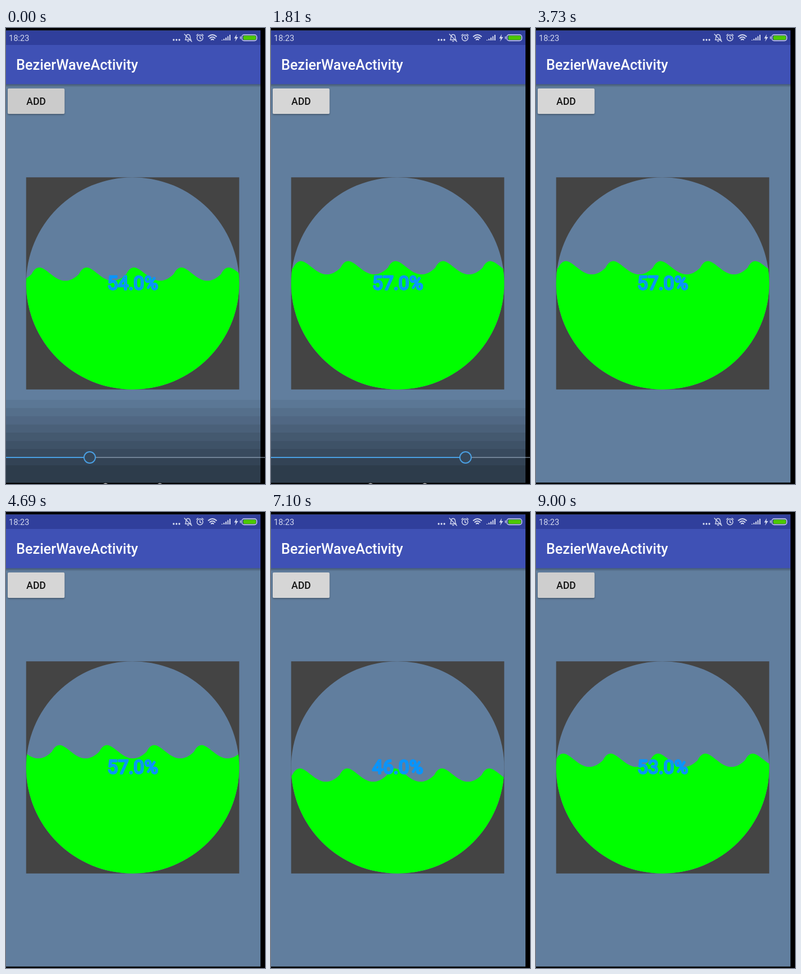
An HTML page that plays this animation: 458 by 807 pixels, repeating every 9.1 s.

```html
<!DOCTYPE html>
<html lang="en">
<head>
<meta charset="utf-8">
<title>Bezier wave</title>
<style>
  html, body { margin: 0; width: 100%; height: 100%; overflow: hidden; background: #000; }
  svg { display: block; width: 458px; height: 807px; }
  text { font-family: Roboto, sans-serif; }
  .medium { font-weight: 500; }
  .icon { fill: none; stroke: #d3d8ee; stroke-width: 1.4; stroke-linecap: round; }
  .solid { fill: #d3d8ee; }
  .screen { fill: #617e9e; }
  #percent { font-size: 33.5px; fill: none; stroke: #0a94fa; stroke-width: 2.8; stroke-linejoin: round; }
</style>
</head>
<body>
<svg viewBox="0 0 458 807">
  <defs>
    <clipPath id="disc"><ellipse cx="224" cy="452" rx="188.4" ry="187.7"/></clipPath>
    <linearGradient id="shade" x2="0" y2="1">
      <stop offset="0" stop-opacity=".28"/>
      <stop offset="1" stop-opacity="0"/>
    </linearGradient>
    <filter id="lift" x="-10%" y="-20%" width="120%" height="150%">
      <feDropShadow dx="0" dy="1.5" stdDeviation="1.5" flood-opacity=".35"/>
    </filter>
  </defs>

  <rect class="screen" y="4.5" width="450" height="800"/>
  <rect y="4.5" width="450" height="25.5" fill="#303f9c"/>
  <rect y="30" width="450" height="69.500" fill="#3f51b5"/>
  <rect y="99.500" width="450" height="5.500" fill="url(#shade)"/>

  <text x="5" y="23" font-size="14.5" fill="#d3d8ee">18:23</text>
  <g class="solid">
    <circle cx="296.5" cy="21" r="1.7"/>
    <circle cx="301.5" cy="21" r="1.7"/>
    <circle cx="306.5" cy="21" r="1.7"/>
    <path d="M408 11L403.500 18.500H406.500L405 24L410.500 16H407.300Z"/>
  </g>
  <g class="icon">
    <path d="M317 21H327C325.500 19 326 17 325.500 14.500C324.500 10.500 319.500 10.500 318.500 14.500C318 17 318.500 19 317 21M321 23.500H323M315.500 11L328.500 24"/>
    <circle cx="343" cy="17.500" r="5.200"/>
    <path d="M343 14.500V18L345 19M337 13L339.500 11M349 13L346.500 11"/>
    <path d="M358 15Q365 9 372 15M360.500 18Q365 14 369.500 18M363 20.800Q365 19 367 20.800" stroke-width="2"/>
    <path d="M382 22V21M385.500 22V19M389 22V17M392.500 22V14.500M396 22V12" stroke-width="2" stroke-linecap="butt"/>
    <rect x="417" y="12" width="26.500" height="10.500" rx="4"/>
    <path d="M414.500 15.500V19"/>
  </g>
  <rect x="419.500" y="13.500" width="22.500" height="7.500" rx="2" fill="#4cc800"/>

  <text class="medium" x="18" y="74.300" font-size="25.100" fill="#fff">BezierWaveActivity</text>
  <rect id="button" x="3" y="107" width="100.500" height="45" rx="2" filter="url(#lift)"/>
  <text class="medium" x="53.300" y="136" font-size="17.500" text-anchor="middle" fill="#151515">ADD</text>

  <rect x="35.600" y="264.300" width="376.800" height="375.400" fill="#444"/>
  <g clip-path="url(#disc)">
    <rect class="screen" x="35" y="264" width="378" height="376"/>
    <path id="wave" fill="#0f0"/>
  </g>
  <text id="percent" x="224" y="463" text-anchor="middle"></text>

  <g id="player">
    <g id="bands"></g>
    <path id="rest" stroke="#a9bdd2" stroke-opacity=".5" stroke-width="2"/>
    <path id="played" stroke="#4a9fe2" stroke-width="2"/>
    <circle id="thumb" cy="760" r="10" fill="#35475a" stroke="#4a9fe2" stroke-width="2"/>
    <circle cx="176" cy="811.500" r="6" fill="#ccc"/>
    <circle cx="272" cy="811.500" r="6" fill="#ccc"/>
  </g>
</svg>
<script>
  const LOOP = 9100;
  const STEPS = 67;   // the picture advances in equal steps
  const RESTART = 39;
  const PERIOD = 376.8 / 4.5;
  const $ = id => document.getElementById(id);
  const clamp = (v, lo, hi) => Math.min(hi, Math.max(lo, v));

  // Each period is one cubic; its crest lies 15 px after the start.
  function wavePath(crest, level) {
    let x = (crest - 15) % PERIOD - PERIOD;
    let d = `M${x} ${level}`;
    for (; x < 420; x += PERIOD) {
      d += `C${x + PERIOD / 4} ${level - 41} ${x + PERIOD / 2} ${level + 41} ${x + PERIOD} ${level}`;
    }
    return d + 'V645H-200Z';
  }

  function drawBands() {
    const count = 9, height = 146.5 / count;
    for (let i = 0; i < count; i++) {
      const y = 658 + i * 14.5;
      const bottom = i < count - 1 ? y + 14.5 : y + height + 14;
      $('bands').innerHTML += `<rect y="${y}" width="450" height="${bottom - y}"
        fill="#020406" opacity="${0.06 * (i + 1)}"/>`;
    }
  }

  // The button is tapped once every two steps, around the loop's seam.
  function stateAt(step) {
    if (step < RESTART) {
      return {
        percent: 54 + Math.min(3, Math.floor(step / 2)),
        crest: 60.3 + 5.98 * step,
        grey: clamp(203 + 3 * (step - 6), 203, 214)
      };
    }
    return {
      percent: 46 + Math.max(0, Math.floor((step - 52) / 2)),
      crest: 5.78 * (step - RESTART) - 22.6,
      grey: clamp(214 - 0.62 * (step - 53), 203, 214)
    };
  }

  function draw(time) {
    const step = Math.floor(time / LOOP * STEPS);
    const { percent, crest, grey } = stateAt(step);
    const thumb = 148 + step * 196 / 13;

    $('wave').setAttribute('d', wavePath(crest, 450.5 + (50 - percent) * 3.75));
    $('percent').textContent = percent.toFixed(1) + '%';
    $('button').setAttribute('fill', `rgb(${grey},${grey},${grey})`);
    $('player').setAttribute('opacity', clamp((19 - step) / 4, 0, 1));
    $('played').setAttribute('d', `M0 760H${thumb}`);
    $('rest').setAttribute('d', `M${Math.min(thumb, 458)} 760H458`);
    $('thumb').setAttribute('cx', thumb);
  }

  drawBands();
  const start = performance.now();
  function tick() {
    draw((performance.now() - start) % LOOP);
    requestAnimationFrame(tick);
  }
  tick();
</script>
</body>
</html>
```
